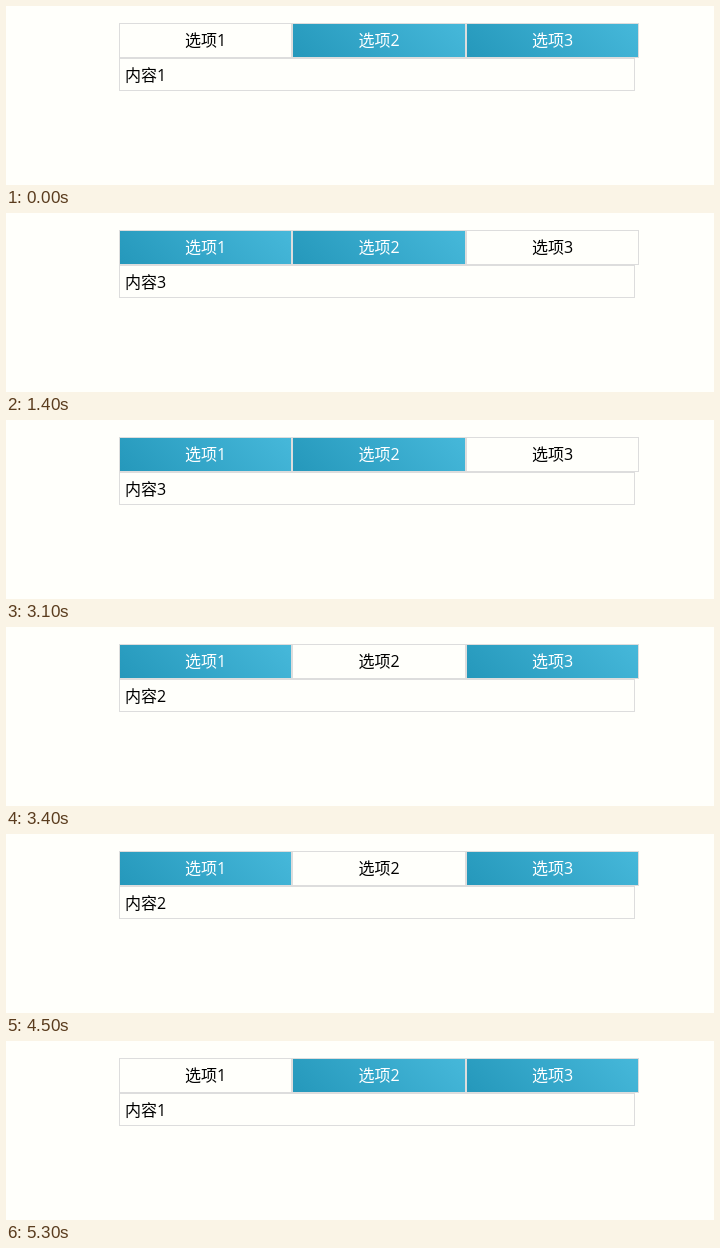
Recreate the animation shown at these times as an HTML page. Size 708 px wide and 179 px high, loop 6200 ms.

```html
<!DOCTYPE html>
<html lang="zh-CN">
<head>
<meta charset="utf-8">
<title>选项卡</title>
<style>
  html, body { margin: 0; width: 100%; height: 100%; overflow: hidden; background: #fffffb; }
  body { position: relative; font: 16px/33px "Open Sans", "Noto Sans CJK SC", "Noto Sans CJK", sans-serif; color: #000; }
  .tab, .panel { position: absolute; box-sizing: border-box; border: 1px solid #ddd; white-space: nowrap; }
  .tab {
    top: 17px; height: 35px; text-align: center; color: #fff;
    background: linear-gradient(45deg, #2598bb, #46b8da) padding-box;
  }
  .tab.active { color: #000; background: #fffffb; }
  .panel { left: 113px; top: 52px; width: 516px; height: 33px; padding-left: 5px; line-height: 32px; }
</style>
</head>
<body>
<script>
  const LOOP = 6200;
  // [start in ms, selected tab]
  const STEPS = [
    [0, 1], [900, 2], [1400, 3], [2200, 1], [3100, 3],
    [3400, 2], [4000, 1], [4500, 2], [4900, 3], [5300, 1]
  ];
  const EDGES = [113, 286, 460, 633];

  function addBox(className, text) {
    const box = document.createElement("div");
    box.className = className;
    box.textContent = text;
    return document.body.appendChild(box);
  }

  const tabs = [1, 2, 3].map(n => {
    const tab = addBox("tab", "选项" + n);
    tab.style.left = EDGES[n - 1] + "px";
    tab.style.width = EDGES[n] - EDGES[n - 1] + "px";
    return tab;
  });
  const panel = addBox("panel", "");
  let selected = 0;

  function select(n) {
    if (n === selected) return;
    selected = n;
    tabs.forEach((tab, i) => tab.classList.toggle("active", i + 1 === n));
    panel.textContent = "内容" + n;
  }

  const origin = performance.now();
  function render(now) {
    const time = Math.max(0, now - origin) % LOOP;
    select(STEPS.findLast(([start]) => start <= time)[1]);
    requestAnimationFrame(render);
  }
  render(origin);
</script>
</body>
</html>
```
